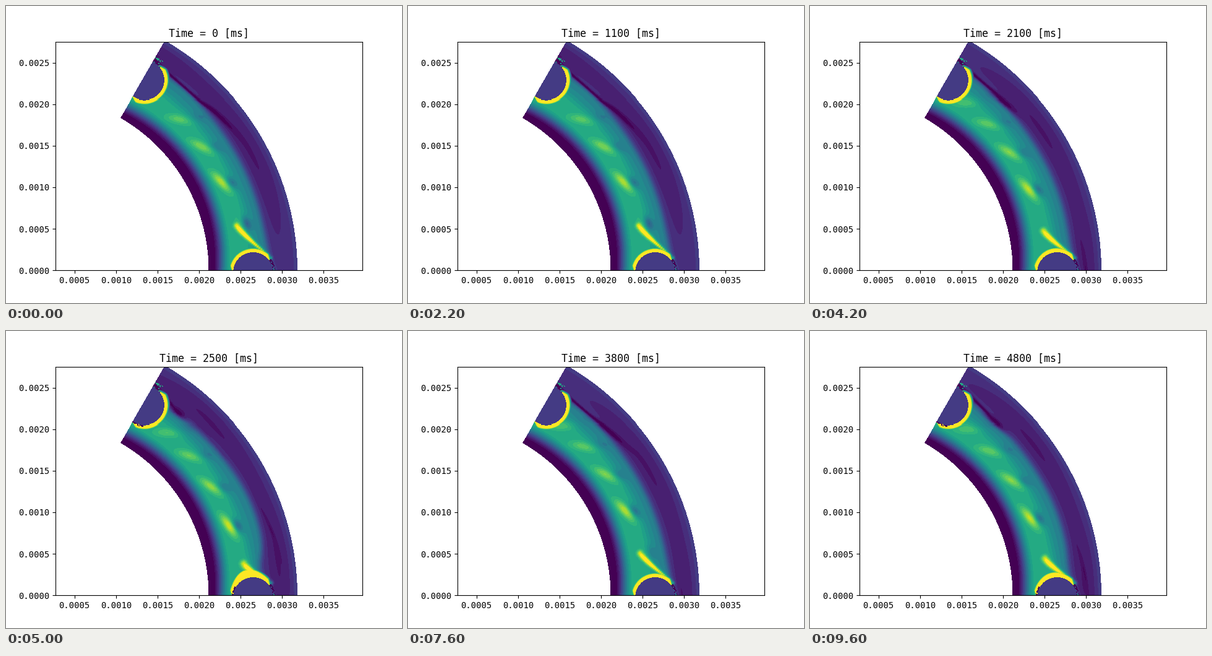
A matplotlib script that plays this animation: 640 px wide and 480 px high, repeating every 9.8 s.

```python
import numpy as np
import matplotlib
import matplotlib.pyplot as plt
from matplotlib.animation import FuncAnimation

matplotlib.rcParams["font.family"] = "DejaVu Sans Mono"

FRAMES, INTERVAL = 49, 200
CYCLE = 11                       # frames after which the flow repeats (two sheddings)
LEVELS = 24
R_IN, R_OUT = 0.00212, 0.00318
SIN60 = np.sin(np.pi / 3)
SCALE = 369.6 / (R_OUT * SIN60)  # pixels per metre
X0 = 0.00212 - 248.1 / SCALE

# Pixel grid of the axes; ox, oy is the rotation axis on screen.
ox, oy = 80 - X0 * SCALE, 427.2
px, py = np.meshgrid(np.arange(80, 576) + 0.5, np.arange(57, 428) + 0.5)
dx, dy = px - ox, oy - py
rad = np.hypot(dx, dy)
theta = np.degrees(np.arctan2(dy, dx))
r_in, r_out = R_IN * SCALE, R_OUT * SCALE
q = (rad - r_in) / (r_out - r_in)
cut = rad * np.radians(theta - 60)
inside = (rad > r_in - 0.6) & (rad < r_out + 0.6) & (cut < 0.6) & (dy > -1)

rng = np.random.default_rng(4)
cells = np.kron(rng.random((186, 248)), np.ones((2, 2)))[:371, :496]

CYL_R, RING = 32, 4.5
TILT = -0.45                     # cylinder centres sit just below the cut lines


def bell(x, mid, width):
    return np.exp(-0.5 * ((x - mid) / width) ** 2)


def ease(x):
    x = np.clip(x, 0, 1)
    return x * x * (3 - 2 * x)


def radius(frac):
    return r_in + frac * (r_out - r_in)


def cylinder(angle):
    """Distance from the surface and polar angle around one cylinder."""
    a = np.radians(angle + TILT)
    x = px - (ox + radius(0.5) * np.cos(a))
    y = (oy - radius(0.5) * np.sin(a)) - py
    return np.hypot(x, y) - CYL_R, np.degrees(np.arctan2(y, x))


LOW, TOP = cylinder(0), cylinder(60)


def base(phase, mid):
    """Mean shear flow: wall layer, green core, teal flank, calm outer flow."""
    near_ends = 0.04 * ((theta - 30) / 30) ** 2
    core = ease((q + near_ends - 0.07) / 0.22) * (0.6 - 0.14 * ease((q - 0.42) / 0.17))
    edge = 0.655 + 0.08 * np.exp(-np.maximum(theta, 0) / 4)
    edge = edge + 0.025 * (1 - 2 * mid) * bell(theta, 50, 7)
    edge = edge + mid * (0.03 * bell(theta, 22, 8) - 0.08 * bell(theta, 6, 3.5))
    outer = 0.14 + 0.05 * ease((q - 0.92) / 0.08)
    for turn in (0, 1):
        patch = 48 - 36 * (phase + turn - 0.45)
        outer = outer - 0.06 * bell(theta, patch, 12) * bell(q, 0.81, 0.07)
    mix = 1 / (1 + np.exp(np.clip((q - edge) / 0.02, -40, 40)))
    return outer + (core - outer) * mix


def add_vortices(v, phase):
    """Bright vortices drifting counter-clockwise, each with a dark eye."""
    for age in phase + np.arange(5):
        th = 15.2 * age - 0.8 * age ** 2 - 2
        rb = radius(0.35 + 0.012 * (age - 1) + 0.05 * np.exp(-4 * (age - 1)))
        tilt = np.radians(5 + 6.5 * age)
        s, n = np.radians(theta - th) * rb, rad - rb
        along = n * np.sin(tilt) - s * np.cos(tilt)
        across = s * np.sin(tilt) + n * np.cos(tilt)
        gain = 0.33 * ease((age - 0.9) / 0.5) * np.exp(-0.35 * (age - 1.4))
        v = v + gain * bell(along, 0, 14) * bell(across, 0, 5)
        eye = 0.3 * ease((age - 0.8) / 0.3) * np.exp(-0.6 * (age - 1))
        v = v - eye * bell(along, 3 + 9 * (age - 1), 8) * bell(across, 12, 4.5)
    return v


def add_dark_layer(v, phase):
    """Dark shear layer leaving the top cylinder and rolling up clockwise."""
    for age in (phase, phase + 1):
        x = age - 0.3
        head = 55 - 9.8 * x - 17.6 * x * abs(x)
        qh = 0.65 + 0.11 * ease((age - 0.6) / 0.5) + 0.1 * max(age - 1.1, 0)
        born = ease((age - 0.25) / 0.15)

        gain = born * (1 - 0.45 * ease((age - 1.1) / 0.5))
        wide = 0.03 - 0.02 * ease((age - 0.6) / 0.8)
        long = 1.8 + 2.2 * ease((age - 0.5) / 0.6)
        slope = 0.006 * ease((age - 0.5) / 0.5)
        v = v * (1 - gain * bell(theta, head, long)
                 * bell(q, qh - slope * (theta - head), wide))

        line = 0.69 + 0.065 * np.exp(-np.maximum(59.5 - theta, 0) / 3.5)
        line = line + (qh - 0.69) * bell(theta, head, 3)
        fade = born * (1 - ease((age - 1.1) / 0.6))
        reach = ease((theta - max(head, 34)) / 3)
        v = v * (1 - fade * reach * bell(q, line, 0.013))
    return v


def curve_distance(a, b, c):
    """Distance to a quadratic curve and the position along it."""
    best, where = np.full(px.shape, 1e9), np.zeros(px.shape)
    for t in np.linspace(0, 1, 30):
        x, y = [(1 - t) ** 2 * a[i] + 2 * t * (1 - t) * b[i] + t * t * c[i] for i in (0, 1)]
        d = np.hypot(px - x, py - y)
        where = np.where(d < best, t, where)
        best = np.minimum(best, d)
    return best, where


def add_tail(v, phase):
    """Yellow shear layer peeling off the lower cylinder."""
    for age in (phase, phase + 1):
        gain = ease((age - 0.3) / 0.15) * (1 - ease((age - 1.05) / 0.45))
        if gain == 0:
            continue
        tip = (398.7 - 26 * age, 402 - 47 * age)
        bend = (tip[0] + 6, tip[1] + 10)
        d, t = curve_distance(tip, bend, (428, 407))
        wide = (5 - 1.7 * age) * (1 - 0.4 * t)
        v = v + 0.55 * gain * (0.6 + 0.4 * np.sin(np.pi * t)) * bell(d, 0, wide)
    return v


def add_cylinder(v, where, start, stop, mid, swell=0):
    d, ang = where
    taper = np.clip(np.minimum(ang - start, stop - ang) / 14, -1, 1)
    width = RING * taper + swell * mid * bell(ang, 105, 24)
    ring = 1 - np.maximum(d - width, 0) * 0.18
    v = np.where(taper > -0.8, np.maximum(v, ring), v)
    # ragged dark film on the lee side
    lee = ang < start if where is LOW else ang > stop
    v = np.where(lee & (d < 4) & (cells > 0.3), 0, v)
    v = np.where(lee & (d < 5) & (cells > 0.9), 0.5, v)
    # thin dark film under the ring while the vortex is forming
    rear = ang > 150 if where is LOW else ang < -92
    v = np.where(rear & (d < 2.2 * (mid > 0.25)) & (cells > 0.25), 0.02, v)
    return np.where(d < 0, 0.19, v)


def picture(step):
    phase = (step * 2 / CYCLE) % 1
    mid = bell(phase, 0.5, 0.15)
    v = base(phase, mid)
    v = add_vortices(v, phase)
    v = add_dark_layer(v, phase)
    v = add_tail(v, phase)
    sparks = (theta > 58) & (abs(q - 0.78) < 0.012) & (cells > 0.45)
    v = np.where(sparks, 0.25 + 0.4 * cells, v)
    v = add_cylinder(v, LOW, 36, 178, mid, swell=8)
    v = add_cylinder(v, TOP, -126, 40, mid)
    band = np.clip(np.floor(v * LEVELS), 0, LEVELS - 1) / (LEVELS - 1)
    rgba = plt.get_cmap("viridis")(band)
    rgba[..., 3] = inside
    return (rgba * 255).round().astype(np.uint8)


pictures = [picture(k) for k in range(CYCLE)]

fig = plt.figure(figsize=(6.4, 4.8), dpi=100)
ax = fig.add_subplot()
extent = (X0, X0 + 496 / SCALE, (oy - 428) / SCALE, (oy - 57) / SCALE)
image = ax.imshow(pictures[0], extent=extent, interpolation="nearest", aspect="auto")
ax.set_xlim(X0, X0 + 496 / SCALE)
ax.set_ylim(0, R_OUT * SIN60)
ax.set_xticks(np.arange(1, 8) * 0.0005)
ax.set_yticks(np.arange(6) * 0.0005)
ax.xaxis.set_major_formatter("{x:.4f}")
ax.yaxis.set_major_formatter("{x:.4f}")
title = ax.set_title("Time = 0 [ms]")


def update(n):
    image.set_data(pictures[n % CYCLE])
    title.set_text(f"Time = {n * 100} [ms]")
    return image, title


anim = FuncAnimation(fig, update, frames=FRAMES, interval=INTERVAL, repeat=True,
                     repeat_delay=0, blit=False)
plt.show()
```
